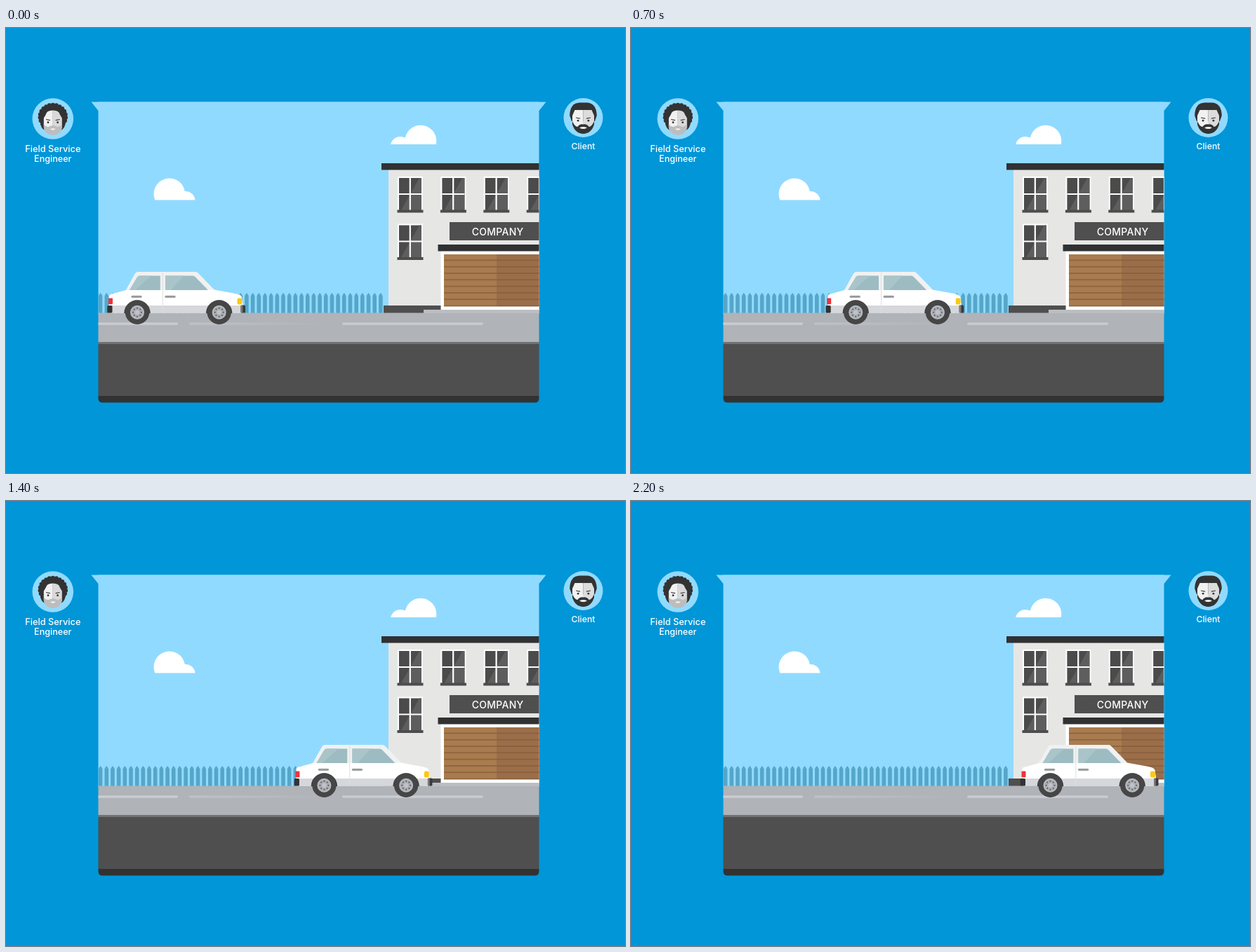
Recreate the animation shown at these times as an HTML page. Size 882 px wide and 635 px high, loop 4200 ms.

```html
<!DOCTYPE html>
<html lang="en">
<head>
<meta charset="utf-8">
<title>Service visit</title>
<style>
  html, body { margin: 0; width: 100%; height: 100%; overflow: hidden; background: #0096d8; }
  svg { display: block; width: 882px; height: 635px; }
  text { font-family: Inter, "Open Sans", sans-serif; font-weight: 500; fill: #fff; text-anchor: middle; }
</style>
</head>
<body>
<svg id="stage" viewBox="0 0 882 635"></svg>
<script>
const LOOP = 4200, STEP = 100, SPEED = 19.03, STOP = 410.5;

const rect = (x, y, w, h, fill, rx = 0) =>
  `<rect x="${x}" y="${y}" width="${w}" height="${h}" rx="${rx}" fill="${fill}"/>`;
const path = (d, fill) => `<path d="${d}" fill="${fill}"/>`;
const circle = (x, y, r, fill) => `<circle cx="${x}" cy="${y}" r="${r}" fill="${fill}"/>`;
const label = (x, y, size, text, extra = "") =>
  `<text x="${x}" y="${y}" font-size="${size}" ${extra}>${text}</text>`;
const repeat = (n, draw) => Array.from({ length: n }, (_, i) => draw(i)).join("");

function clouds() {
  return path("M212.3 245.5A22.3 22.3 0 1 1 254.8 233A13.5 13.5 0 0 1 269.5 245.5Z", "#fff")
    + path("M548.3 166A14 13 0 0 1 568.8 156.5A22.4 22.4 0 1 1 612.8 166Z", "#fff");
}

function fence() {
  return repeat(47, i => {
    const x = 131.8 + i * 8.68;
    return path(`M${x} 407V382.5Q${x + 1} 379.5 ${x + 2.8} 378Q${x + 4.6} 379.5 ${x + 5.6} 382.5V407Z`, "#55a6c9");
  });
}

function sash(x, y) {
  return rect(x, y, 36, 50, "#fff")
    + rect(x + 2, y + 2, 32, 46, "#4b4b4b")
    + path(`M${x + 31} ${y + 2}h3v46h-29Z`, "#5e5e5e")
    + rect(x + 16.7, y, 2.2, 49, "#fff")
    + rect(x + 2, y + 24, 32, 2, "#fff")
    + rect(x - .5, y + 47.5, 37, 4, "#4d4d4d");
}

function building() {
  return rect(545, 202, 215, 201, "#e6e6e5")
    + rect(535, 193, 225, 9.5, "#303132")
    + repeat(4, i => sash(558 + i * 61.4, 212))
    + sash(558, 279.5)
    + rect(632, 277, 128, 26, "#4f4f4f")
    + label(700.7, 295.6, 14, "COMPANY", 'letter-spacing=".25"')
    + rect(619.5, 318, 141, 85, "#fff")
    + rect(624, 323, 136, 74, "#a97c50")
    + rect(699, 323, 61, 74, "#9b6e4a")
    + repeat(8, i => rect(624, 330.5 + i * 9.3, 75, 1.8, "#8f643d") + rect(699, 330.5 + i * 9.3, 61, 1.8, "#8b603f"))
    + rect(615.5, 309, 145, 9.5, "#303132")
    + rect(538, 396, 81.5, 11, "#4f4f4f")
    + rect(595, 402, 165, 5, "#c5c6c8");
}

function road() {
  return rect(131, 406.5, 630, 42, "#b0b3b8")
    + rect(595, 402.5, 165, 4.5, "#bcbdc0")
    + rect(120, 420.2, 125, 3.6, "#c9cdcf", 1.8)
    + rect(261, 420.2, 202, 3.6, "url(#fade)", 1.8)
    + rect(479, 420.2, 201, 3.6, "#c9cdcf", 1.8)
    + rect(131, 448, 630, 3, "#727272")
    + rect(131, 451, 630, 74, "#4f4f4f")
    + rect(131, 525, 630, 10, "#323232");
}

function wheel(x) {
  const y = 405.7;
  return path(`M${x - 18.7} 407A18.7 18.7 0 0 1 ${x + 18.7} 407Z`, "#3c3c3c")
    + circle(x, y, 17.2, "#464646")
    + circle(x, y, 10, "#b9bcc0")
    + circle(x, y, 8.2, "#a9acb1")
    + repeat(8, i => {
        const a = i * Math.PI / 4;
        return circle(x + 6 * Math.cos(a), y + 6 * Math.sin(a), 1, "#55575a");
      })
    + circle(x, y, 3.2, "#bfc2c6");
}

function car() {
  const handle = x => rect(x, 381.5, 16, 4, "#e2e2e2", 2) + rect(x + .5, 382, 15, 2.8, "#97999b", 1.4);
  return path("M147 406.5V383Q147 380.5 150 379.7L171 374L184 350.5Q185.5 348 188.5 348H269Q272 348 274 350.2L296.5 373.5L327 379Q335 380.5 336 384L338 398V406.5Z", "#fff")
    + path("M171 374L184 350.5Q185.5 348 188.5 348H269Q272 348 274 350.2L296.5 373.5Z", "#f1f1f1")
    + path("M176 374L187 355.5Q188.3 353.5 190.5 353.5H219.8V374Z", "#9dbcc2")
    + path("M176 374L187 355.5Q188.3 353.5 190.5 353.5H207L184 374Z", "#a9c5ca")
    + path("M227 374V353.5H266Q268 353.5 269.5 355L288 374Z", "#9dbcc2")
    + path("M227 374V353.5H253L235 374Z", "#a9c5ca")
    + rect(147, 396, 191, 10.5, "#d5d7da")
    + rect(222.8, 349, 1, 57, "#dedfe0")
    + handle(178) + handle(226)
    + rect(146, 385.5, 6, 8.8, "#f0323c", 1)
    + rect(329.5, 385.5, 6.8, 9, "#fcc812", 2)
    + rect(144.3, 396, 7.2, 10.5, "#333", 1.5)
    + rect(334.5, 395.5, 6.5, 11, "#3a3a3a", 1.5)
    + rect(334.5, 395.5, 2.8, 11, "#77797b", 1)
    + wheel(187) + wheel(303.7);
}

// Face parts are drawn around the centre of the badge.
function eyes(gap, y) {
  return [-1, 1].map(s =>
    path(`M${s * (gap - 3)} ${y - 2.6}L${s * (gap + 3)} ${y - 3.6}V${y - 2.4}L${s * (gap - 3)} ${y - 1.2}Z`, "#333")
    + circle(s * gap, y + 1.2, 1.4, "#333")).join("");
}

function engineer() {
  const curls = repeat(17, i => {
    const a = Math.PI * (.8 + i * 1.4 / 16);
    return circle(18.3 * Math.cos(a), -3 + 16.8 * Math.sin(a), 3, "#333");
  });
  return `<g transform="translate(66.8 129.5)">`
    + circle(0, 0, 29.3, "#91daff")
    + curls
    + path("M-18-3A18 17 0 0 1 18-3V5Q17 14 12 16H-12Q-17 14-18 5Z", "#333")
    + path("M0-12Q-9-12-10-6L-13-1V11Q-12 22 0 23Z", "#f1f1f1")
    + path("M0-12Q9-12 10-6L13-1V11Q12 22 0 23Z", "#d9d9d9")
    + path("M-13 8Q-9 13-5 11Q0 8 5 11Q9 13 13 8V13Q11 23 0 23.5Q-11 23-13 13Z", "#bdbdbd")
    + path("M-4 14.5Q0 13 4 14.5Q0 18 -4 14.5Z", "#f3f3f3")
    + eyes(6.8, 4) + `</g>`;
}

function client() {
  return `<g transform="translate(822.5 128)">`
    + circle(0, 0, 28, "#91daff")
    + path("M-19.3-3Q-19-21 -5-21.5H6Q19-20 19.3-3L16.5 5H-16.5Z", "#333")
    + path("M0-11H-12L-15.5-3V9Q-13 20 0 22Z", "#f1f1f1")
    + path("M0-11H12L15.5-3V9Q13 20 0 22Z", "#dcdcdc")
    + path("M-15.5 5Q-12 13-8 13Q-5 8.5 0 9.5Q5 8.5 8 13Q12 13 15.5 5V10Q12 20 5 22Q0 24-5 22Q-12 20-15.5 10Z", "#333")
    + path("M-5.5 14.2Q0 12 5.5 14.2Q0 18-5.5 14.2Z", "#f3f3f3")
    + eyes(7.4, 3) + `</g>`;
}

const stage = document.getElementById("stage");
stage.innerHTML = `
  <defs>
    <clipPath id="panel"><path d="M131.5 105H759.5V528.5Q759.5 534.5 753.5 534.5H137.5Q131.5 534.5 131.5 528.5Z"/></clipPath>
    <linearGradient id="fade">
      <stop offset="0" stop-color="#bec1c5"/><stop offset="1" stop-color="#b0b3b8"/>
    </linearGradient>
  </defs>`
  + rect(0, 0, 882, 635, "#0096d8")
  + path("M121.5 105.5H769.5L759.5 118H131.5Z", "#91daff")
  + `<g clip-path="url(#panel)">`
  + rect(131, 105.5, 630, 303, "#91daff")
  + clouds() + fence() + building() + road()
  + `<g id="car">${car()}</g></g>`
  + engineer() + client()
  + label(66.8, 176.7, 12.8, "Field Service")
  + label(66.8, 191, 12.6, "Engineer")
  + label(822.5, 172.8, 12.3, "Client");

const carNode = document.getElementById("car");
const start = performance.now();

function render(time) {
  const steps = Math.floor(time / STEP);
  carNode.setAttribute("transform", `translate(${Math.min(steps * SPEED, STOP)} 0)`);
}

function tick() {
  render((performance.now() - start) % LOOP);
  requestAnimationFrame(tick);
}
tick();
</script>
</body>
</html>
```
